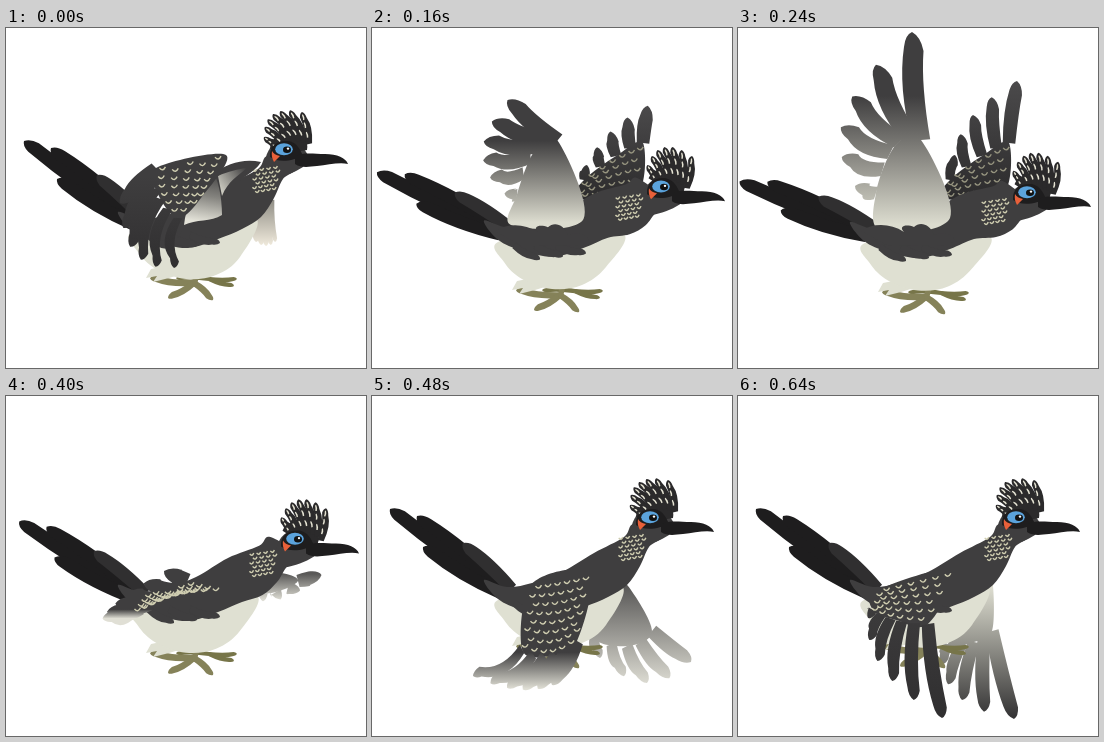
Write an HTML page with a canvas that moves like this. It is 360 by 340 pixels and loops after 0.72 s.

```html
<!DOCTYPE html>
<html lang="en">
<head>
<meta charset="utf-8">
<title>Flapping bird</title>
<style>
html, body { margin: 0; width: 100%; height: 100%; overflow: hidden; background: #fff; }
canvas { display: block; width: 360px; height: 340px; }
</style>
</head>
<body>
<canvas id="stage"></canvas>
<script>
const STEP = 80, COUNT = 9, W = 360, H = 340;
const DARK = '#3f3e3f', INK = '#1e1d1e', CREAM = '#dfe0d2', PALE = '#dcdccf', LEG = '#858259', SPECK = '#cfcdb0';
const canvas = document.getElementById('stage');
const ctx = canvas.getContext('2d');
const dpr = window.devicePixelRatio || 1;
canvas.width = W * dpr;
canvas.height = H * dpr;

const lerp = (a, b, u) => a + (b - a) * u;
const mix = ([ax, ay], [bx, by], u) => [lerp(ax, bx, u), lerp(ay, by, u)];
const ease = u => { u = Math.min(1, Math.max(0, u)); return u * u * (3 - 2 * u); };

// Point on the parabola that passes through a, b, c at u = 0, .5, 1
const arc = ([a, b, c], u) => [0, 1].map(k =>
  a[k] * (1 - u) * (1 - 2 * u) + b[k] * 4 * u * (1 - u) + c[k] * u * (2 * u - 1));

// A wing is a panel between root and rim, with feathers fanned from rim to tips.
const pose = (root, rim, tips, w, bend, look) => ({ root, rim, tips, w, bend, ...look });
const blend = (a, b, u = .5) => ({
  ...b,
  root: a.root.map((p, i) => mix(p, b.root[i], u)),
  rim: a.rim.map((p, i) => mix(p, b.rim[i], u)),
  tips: a.tips.map((p, i) => mix(p, b.tips[i], u)),
  w: lerp(a.w, b.w, u)
});
const reach = (p, u) => ({ ...p, tips: p.tips.map((t, i) => mix(p.rim[i], t, u)) });

const under = { panel: [PALE, '#8d8c86', DARK, DARK], up: true };
const back = { panel: [DARK, DARK], plume: [DARK, '#302f30'], rows: 6 };

function nearPoses() {
  const fold = pose([[220, 127], [195, 170]], [[150, 140], [152, 166], [172, 190]],
    [[114, 175], [129, 226], [168, 240]], 15, .12, { ...back, rows: 5 });
  const lift = pose([[211, 192], [137, 192]], [[188, 113], [168, 128], [152, 168]],
    [[97, 140], [114, 162], [148, 173]], 15, .16, { ...under, plume: ['#2a292a', DARK] });
  const high = pose([[212, 190], [143, 203]], [[183, 112], [157, 118], [138, 165]],
    [[174, 4], [107, 84], [117, 158]], 22, -.1, under);
  const drop = pose([[213, 210], [124, 205]], [[158, 125], [125, 150], [108, 178]],
    [[136, 61], [87, 113], [92, 165]], 20, -.14, under);
  const down = pose([[217, 178], [160, 188]], [[205, 245], [178, 260], [150, 253]],
    [[180, 289], [143, 293], [101, 280]], 16, -.12, { ...back, plume: [DARK, DARK, DARK, '#e0dfd5'], rows: 8 });
  const sweep = pose([[215, 174], [140, 194]], [[190, 228], [158, 224], [135, 214]],
    [[204, 322], [146, 275], [130, 222]], 15, .08, back);
  return [fold, lift, blend(lift, high), high, drop, blend(drop, down), down,
    reach(blend(down, sweep), 1.4), sweep];
}

function farPoses() {
  const fold = pose([[250, 160], [266, 160]], [[251, 172], [258, 174], [266, 172]],
    [[250, 214], [260, 218], [269, 214]], 8, .03, { panel: ['#77766f', '#f0eadc'] });
  const lift = pose([[262, 116], [200, 158]], [[267, 154], [257, 158], [246, 160]],
    [[270, 117], [257, 119], [246, 136]], 7, .04, { panel: [DARK, DARK], plume: ['#d5d4cb', '#8b8a88'], rows: 5 });
  const high = pose([[264, 168], [205, 170]], [[271, 115], [244, 128], [212, 152]],
    [[279, 53], [235, 87], [217, 127]], 15, -.05, { panel: ['#2d2c2d', '#4b4a4b'], rows: 5 });
  const drop = pose([[300, 165], [262, 165]], [[304, 135], [285, 142], [262, 154]],
    [[312, 92], [274, 120], [255, 138]], 14, -.05, { panel: ['#8a8987', '#5a595a'] });
  const down = pose([[256, 190], [246, 192]], [[280, 235], [255, 250], [222, 240]],
    [[319, 266], [275, 287], [228, 262]], 16, .08, { panel: ['#5a5958', '#dbdad1'] });
  const sweep = pose([[255, 190], [250, 194]], [[254, 235], [236, 246], [210, 248]],
    [[276, 323], [224, 304], [204, 268]], 16, .05, { panel: [PALE, '#323132'] });
  return [fold, lift, reach(high, .6), high, drop, blend(drop, down), down,
    reach(blend(down, sweep), 1.4), sweep];
}

const near = nearPoses(), far = farPoses();

const body = [262,128, 252,141, 222,157, 190,176, 160,187, 135,191, 112,184, 126,203,
  150,214, 182,220, 212,211, 236,201, 255,189, 268,170, 277,151, 290,140];
const belly = [126,204, 132,224, 150,241, 180,251, 210,247, 234,229, 250,190, 190,195];

const pairs = list => list.flatMap((v, i) => i % 2 ? [] : [[v, list[i + 1]]]);

// The trunk sinks evenly; the neck leans further forward and down.
const sag = (list, sink) => pairs(list).map(([x, y]) => {
  const neck = ease((x - 235) / 55);
  return [x + 10 * neck * sink, y + (10 + 33 * neck) * sink];
});

function smooth(pts) {
  const n = pts.length, path = new Path2D();
  const at = i => pts[(i + n) % n];
  path.moveTo(...pts[0]);
  for (let i = 0; i < n; i++) {
    const [a, b, c, d] = [at(i - 1), at(i), at(i + 1), at(i + 2)];
    path.bezierCurveTo(b[0] + (c[0] - a[0]) / 6, b[1] + (c[1] - a[1]) / 6,
      c[0] - (d[0] - b[0]) / 6, c[1] - (d[1] - b[1]) / 6, ...c);
  }
  path.closePath();
  return path;
}

function fill(path, color) {
  ctx.fillStyle = color;
  ctx.fill(typeof path === 'string' ? new Path2D(path) : path);
}

function oval(x, y, rx, ry, color) {
  ctx.fillStyle = color;
  ctx.beginPath();
  ctx.ellipse(x, y, rx, ry, 0, 0, 2 * Math.PI);
  ctx.fill();
}

function shade(x0, y0, x1, y1, colors) {
  const grad = ctx.createLinearGradient(x0, y0, x1, y1);
  colors.forEach((c, i) => grad.addColorStop(i / (colors.length - 1), c));
  return grad;
}

function feather([bx, by], [tx, ty], w, color, bend = .06) {
  const len = Math.hypot(tx - bx, ty - by);
  const dx = (tx - bx) / len, dy = (ty - by) / len;
  const at = (along, side) => [bx + dx * along - dy * side, by + dy * along + dx * side];
  const c = len * bend * 2, path = new Path2D();
  path.moveTo(...at(0, -w * .42));
  path.quadraticCurveTo(...at(len * .5, c - w * .55), ...at(len - w * .65, -w * .42));
  path.quadraticCurveTo(...at(len - w * .1, -w * .32), ...at(len, 0));
  path.quadraticCurveTo(...at(len - w * .25, w * .38), ...at(len - w * .9, w * .45));
  path.quadraticCurveTo(...at(len * .5, c + w * .5), ...at(0, w * .42));
  path.closePath();
  fill(path, color);
}

// Rows of crescents; spot(u, v) maps the unit square onto the plumage.
function speckle(rows, cols, size, color, spot) {
  ctx.strokeStyle = color;
  ctx.lineWidth = 1.4;
  ctx.beginPath();
  for (let r = 0; r < rows; r++) {
    for (let i = 0; i < cols; i++) {
      const [x, y] = spot((i + (r % 2 ? .75 : .25)) / cols, (r + .5) / rows);
      ctx.moveTo(x - size, y - 1);
      ctx.quadraticCurveTo(x + .5, y + size * 1.1, x + size, y - 2);
    }
  }
  ctx.stroke();
}

function wing(p, count, dots) {
  const { root, rim, tips } = p;
  const y0 = (root[0][1] + root[1][1]) / 2;
  const ends = [...tips, ...rim].map(q => q[1]);
  const y1 = ends.reduce((a, y) => Math.abs(y - y0) > Math.abs(a - y0) ? y : a, y0);
  fill(smooth([root[0], ...rim, root[1]]), shade(0, y0, 0, y1, p.panel));
  const color = shade(0, y0, 0, y1, p.plume || p.panel);
  for (let i = 0; i < count; i++) {
    const u = i / (count - 1);
    feather(arc(rim, u), arc(tips, u), p.w * lerp(1, .7, u), color, p.bend * lerp(.3, 1.1, u));
  }
  if (p.rows) speckle(p.rows, 6, 3, dots, (u, v) => mix(mix(...root, u), arc(rim, u), v));
}

function move(x, y, turn, px, py, paint) {
  ctx.save();
  ctx.translate(px + x, py + y);
  ctx.rotate(turn * Math.PI / 180);
  ctx.translate(-px, -py);
  paint();
  ctx.restore();
}

function tail() {
  feather([130, 193], [18, 113], 15, INK, -.01);
  feather([128, 187], [45, 120], 14, INK, .02);
  feather([128, 197], [51, 151], 14, INK, -.02);
  feather([140, 193], [91, 147], 14, '#302f30', .02);
}

function feet() {
  for (const tip of [[231, 251], [228, 258], [170, 250]]) feather([203, 251], tip, 5, '#777549', .04);
  for (const tip of [[144, 250], [162, 270], [207, 272]]) feather([188, 255], tip, 7, LEG, -.04);
  feather([192, 245], [188, 259], 6, LEG);
  fill('M145 241L140 250L151 248L147 254L163 250L176 246L160 238Z', CREAM);
}

function crest() {
  fill('M264 121C264 110 275 103 287 105C297 106 303 113 301 122L284 125Z', '#2b2a2b');
  const ends = [[258, 109], [267, 86], [296, 84]], roots = [[272, 121], [289, 113], [303, 116]];
  for (let i = 0; i < 7; i++) {
    const a = arc(roots, i / 6), b = arc(ends, i / 6);
    feather(a, b, 7.5, '#2b2a2b', .06);
    for (const u of [.2, .5, .75]) feather(mix(a, b, u), mix(a, b, u + .18), 1.7, '#e4e2d2');
  }
}

function head(tilt) {
  fill('M258 139C260 118 270 112 282 113C292 114 299 120 302 128L297 139C288 145 278 148 268 150Z', DARK);
  move(0, 0, tilt, 285, 121, crest);
  fill('M264 129C263 117 272 112 283 113C291 115 294 121 297 128C288 132 274 136 264 129Z', INK);
  fill('M289 128C297 124 308 126 319 126C331 126 340 130 342 136C333 134 322 137 311 138C302 139 295 140 289 136Z', INK);
  fill('M266 123Q268 127 274 128L268 134Q265 129 266 123Z', '#e8603a');
  oval(278, 121.3, 8.8, 6, '#5ba3dc');
  oval(281, 121.8, 4, 3.3, '#111');
  oval(282, 120.6, 1.2, 1.2, '#fff');
}

// Folded far shoulder with the pale lining of both wings
function shoulder() {
  fill('M206 146C222 135 238 130 255 134C248 146 232 150 222 164C214 176 212 190 204 192C190 195 178 196 172 210C168 190 180 160 206 146Z', DARK);
  fill('M205 140C212 150 216 168 216 187C205 194 190 191 178 197C180 178 190 155 205 140Z', shade(205, 142, 196, 194, [DARK, '#85847f', '#e3e2d8']));
  fill('M212 148C222 143 232 142 242 139C232 148 222 153 216 168Z', shade(240, 140, 214, 160, [DARK, '#c9c8be']));
}

function saddle() {
  fill('M123 203C135 195 152 195 166 204C160 198 168 196 176 199C182 193 192 196 196 207C206 203 213 206 217 212L210 217L150 218Z', DARK);
}

function draw(i) {
  // Six steps dip down and return, the last ones rebound slightly.
  const sink = i <= 6 ? Math.sin(Math.PI * i / 6) : i === 7 ? -.1 : 0;
  const lean = ease(sink * 2);
  ctx.setTransform(dpr, 0, 0, dpr, 0, 0);
  ctx.fillStyle = '#fff';
  ctx.fillRect(0, 0, W, H);
  wing(far[i], 5, '#96947f');
  move(0, 11 * sink, -14 * sink * Math.abs(sink), 130, 195, tail);
  move(0, 14 * sink, 0, 0, 0, feet);
  fill(smooth(sag(belly, sink * 1.15)), CREAM);
  fill(smooth(sag(body, sink)), DARK);
  move(0, 12 * sink, 0, 0, 0, () => {
    for (let k = 0; k < 3; k++) feather([142 + 21 * k, 207], [168 + 23 * k, 221 - 3 * k], 8, DARK);
  });
  move(11 * lean, 43 * sink, 0, 0, 0, () => head(22 * lean));
  move(-3 * lean, 32 * sink, 0, 0, 0, () => speckle(6, 4, 2, SPECK,
    (u, v) => [247 + lerp(28, 22, v) * u, 141 + 26 * v - 4 * u]));
  if (i === 0) shoulder();
  wing(near[i], 6, SPECK);
  if (near[i].up) move(0, near[i].root[0][1] - 192 + 2, 0, 0, 0, () => {
    ctx.translate(0, -Math.max(0, 1 - sink) * 6);
    saddle();
  });
}

const start = performance.now();
function tick() {
  const t = Math.max(0, performance.now() - start);
  draw(Math.floor(t / STEP) % COUNT);
  requestAnimationFrame(tick);
}
tick();
</script>
</body>
</html>
```
